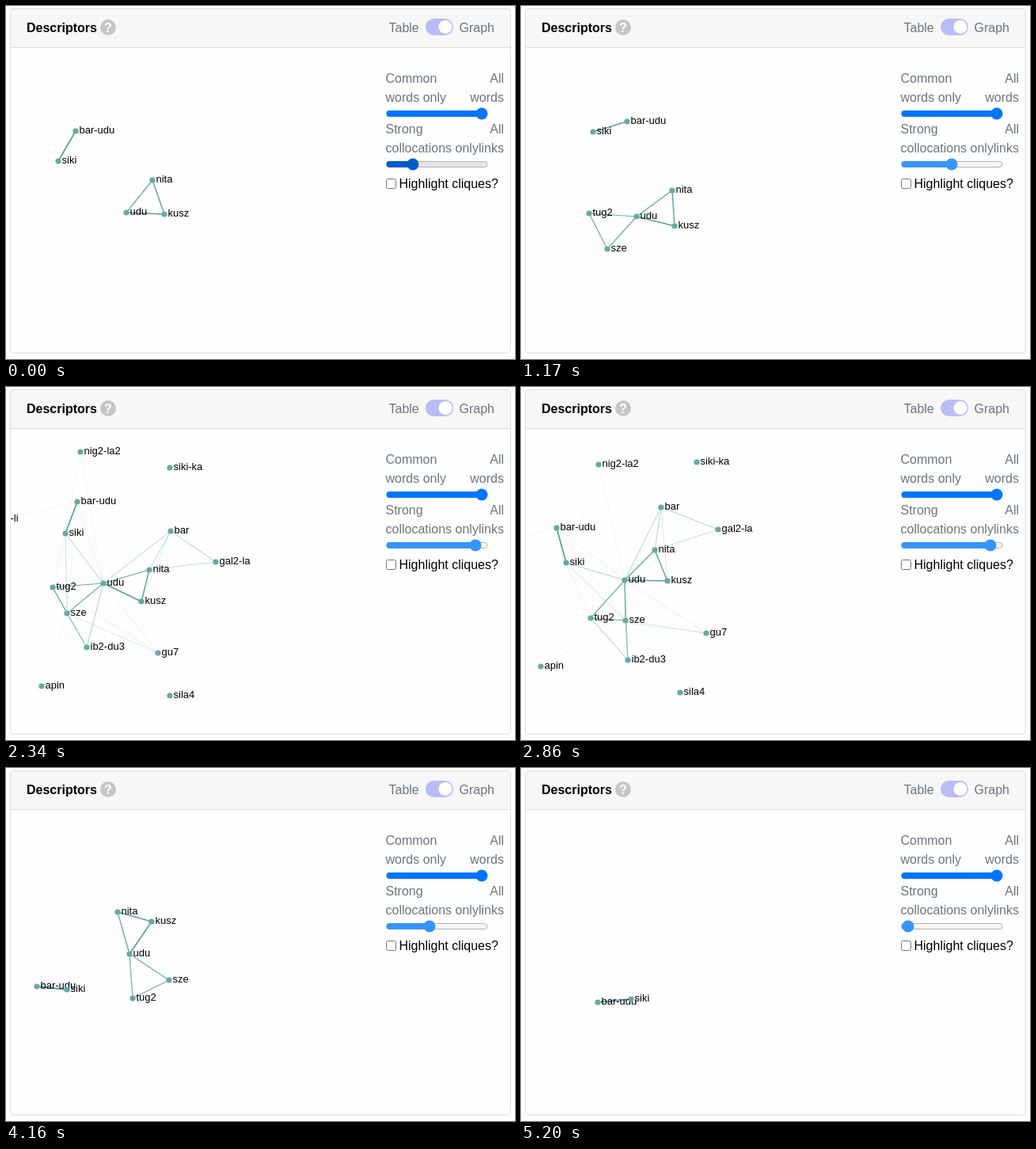
Animation of 643 by 446 pixels, one loop 5.33 s. Source, as an HTML page:

```html
<!DOCTYPE html>
<html lang="en">
<head>
<meta charset="utf-8">
<title>Descriptors graph</title>
<style>
  html, body { margin: 0; width: 100%; height: 100%; overflow: hidden; background: #fff; }
  svg { display: block; width: 643px; height: 446px; font: 16px "Liberation Sans", Arial, sans-serif; }
  .muted { fill: #6c757d; }
  .end { text-anchor: end; }
  .bold { font-weight: bold; }
  #links line { stroke: #5aa39d; }
  #nodes circle { fill: #67a9a0; }
  #nodes text { font-size: 13px; fill: #000; }
</style>
</head>
<body>
<svg viewBox="0 0 643 446">
  <defs><clipPath id="pane"><rect x="6" y="53" width="631" height="385"/></clipPath></defs>

  <rect x="5.5" y="3.5" width="632" height="435" rx="4" fill="#fefefe"/>
  <path d="M5.5 52.5V7.5a4 4 0 0 1 4-4h624a4 4 0 0 1 4 4v45z" fill="#f7f7f7"/>
  <path d="M6 52.5H637" stroke="#dedede"/>
  <rect x="5.5" y="3.5" width="632" height="435" rx="4" fill="none" stroke="#dedede"/>

  <text class="bold" x="26" y="33">Descriptors</text>
  <circle cx="129" cy="27" r="10" fill="#c6c6c6"/>
  <text class="bold" x="129" y="33" text-anchor="middle" fill="#fff">?</text>

  <g class="muted">
    <text x="483.5" y="33">Table</text>
    <text x="572.5" y="33">Graph</text>
    <text x="479.5" y="97">Common</text>
    <text x="479.5" y="121">words only</text>
    <text x="479.5" y="161">Strong</text>
    <text x="479.5" y="185">collocations only</text>
    <g class="end">
      <text x="629" y="97">All</text>
      <text x="629" y="121">words</text>
      <text x="629" y="161">All</text>
      <text x="629" y="185">links</text>
    </g>
  </g>
  <rect x="530" y="16" width="35" height="21" rx="10.5" fill="#b9bdf7"/>
  <circle cx="555" cy="26.5" r="8.5" fill="#fff"/>

  <g>
    <rect x="481" y="132.5" width="127" height="7" rx="3.5" fill="#efefef" stroke="#b2b2b2"/>
    <rect x="480.5" y="132" width="124" height="8" rx="4" fill="#0075ff"/>
    <circle cx="601" cy="136" r="7.5" fill="#0075ff"/>
  </g>
  <g>
    <rect id="track" x="481" y="196.5" width="127" height="7" rx="3.5" stroke="#b2b2b2"/>
    <rect id="fill" x="480.5" y="196" height="8" rx="4"/>
    <circle id="thumb" cy="200" r="7.5"/>
  </g>

  <rect x="480.5" y="218.5" width="12" height="12" rx="2" fill="#fff" stroke="#767676"/>
  <text x="496.5" y="230">Highlight cliques?</text>

  <g clip-path="url(#pane)"><g id="links"></g><g id="nodes"></g></g>
</svg>
<script>
const LOOP = 5330, STEP = 130;
const KEYS = [0, 1170, 2340, 2860, 3640, 4160, 5200];

// Strength slider: [time, thumb x]
const SLIDER = [[0, 514], [260, 515], [650, 530], [1170, 544], [2150, 593], [3000, 593],
  [3640, 570], [4160, 535], [4820, 489], [5330, 489]];

// name: [slider x from which it shows, first key, positions at successive keys]
const NODES = {
  'bar-udu': [0, 0, [[88, 158], [134, 146], [90, 145], [45, 178], [29, 227], [39, 276], [97, 296]]],
  'siki': [0, 0, [[66, 196], [91, 159], [75, 185], [57, 222], [65, 258], [77, 280], [139, 292]]],
  'udu': [505, 0, [[152, 261], [146, 266], [123, 248], [131, 244], [144, 245], [156, 235], [155, 225]]],
  'nita': [505, 0, [[185, 220], [191, 233], [181, 231], [169, 206], [149, 190], [141, 182], [110, 195]]],
  'kusz': [505, 0, [[200, 263], [194, 278], [171, 271], [185, 245], [187, 216], [184, 194], [150, 176]]],
  'tug2': [524, 1, [[86, 262], [59, 253], [88, 292], [130, 296], [160, 291]]],
  'sze': [524, 1, [[109, 307], [77, 286], [132, 295], [180, 295], [206, 268]]],
  'ib2-du3': [545, 2, [[102, 329], [135, 345], [137, 345]]],
  'bar': [555, 2, [[208, 182], [177, 152], [133, 136]]],
  'gal2-la': [555, 2, [[265, 221], [249, 180], [211, 134]]],
  'nig2-la2': [580, 2, [[94, 82], [98, 98]]],
  'siki-ka': [580, 2, [[207, 102], [222, 95]]],
  'gu7': [580, 2, [[192, 336], [234, 311]]],
  'apin': [585, 2, [[45, 378], [25, 353]]],
  'sila4': [585, 2, [[207, 390], [201, 386]]],
  '-li': [585, 2, [[1, 167], [-40, 200]]]
};

// from, to, width, opacity, slider x from which it shows
const LINKS = [
  ['bar-udu', 'siki', 1.8, 1, 0], ['udu', 'kusz', 1.7, 1, 0], ['nita', 'kusz', 1.4, 1, 0],
  ['udu', 'nita', 1.3, .95, 0], ['tug2', 'udu', 1.2, .9, 0], ['tug2', 'sze', 1.2, .9, 0],
  ['sze', 'udu', 1.2, .9, 0], ['sze', 'ib2-du3', 1, .65, 0], ['tug2', 'ib2-du3', 1, .55, 0],
  ['udu', 'ib2-du3', 1, .5, 0], ['siki', 'udu', 1, .5, 555], ['siki', 'sze', 1, .3, 563],
  ['bar', 'gal2-la', 1, .5, 0], ['bar', 'nita', 1, .45, 0], ['bar', 'udu', 1, .45, 0],
  ['nita', 'gal2-la', 1, .35, 0], ['bar', 'kusz', 1, .2, 580], ['siki', 'tug2', 1, .12, 580],
  ['bar-udu', 'udu', 1, .12, 580], ['bar-udu', 'sze', 1, .1, 580], ['gu7', 'sze', 1, .22, 0],
  ['gu7', 'tug2', 1, .15, 0], ['gu7', 'udu', 1, .15, 0], ['nig2-la2', 'udu', 1, .09, 0],
  ['nig2-la2', 'siki', 1, .08, 0], ['siki-ka', 'udu', 1, .09, 0], ['apin', 'sze', 1, .09, 0],
  ['-li', 'bar-udu', 1, .09, 0]
];

const $ = id => document.getElementById(id);

function add(parent, tag, attrs) {
  const el = document.createElementNS('http://www.w3.org/2000/svg', tag);
  set(el, attrs);
  return parent.appendChild(el);
}

function set(el, attrs) {
  for (const k in attrs) el.setAttribute(k, attrs[k]);
}

const linkEls = LINKS.map(([, , w, o]) => add($('links'), 'line', { 'stroke-width': w, 'stroke-opacity': o }));
const nodeEls = {};
for (const name in NODES) {
  const g = add($('nodes'), 'g', {});
  add(g, 'circle', { r: 3.6 });
  add(g, 'text', { x: 4.5, y: 3 }).textContent = name;
  nodeEls[name] = g;
}

function sliderAt(t) {
  const i = SLIDER.findIndex(([end]) => t < end);
  const [t0, x0] = SLIDER[i - 1], [t1, x1] = SLIDER[i];
  return x0 + (x1 - x0) * (t - t0) / (t1 - t0);
}

// Smooth curve through the points p at times ts
function curve(ts, p, t) {
  const last = ts.length - 1;
  let i = 0;
  while (i < last - 1 && t >= ts[i + 1]) i++;
  const h = ts[i + 1] - ts[i], u = (t - ts[i]) / h;
  const slope = (j, k) => {
    const a = Math.max(j - 1, 0), b = Math.min(j + 1, last);
    return (p[b][k] - p[a][k]) / (ts[b] - ts[a]) * h;
  };
  const v = 1 - u;
  return [0, 1].map(k =>
    v * v * (1 + 2 * u) * p[i][k] + u * u * (3 - 2 * u) * p[i + 1][k] +
    u * v * v * slope(i, k) - u * u * v * slope(i + 1, k));
}

// Outside its own keys a node keeps its offset from the hub
function place(name, t) {
  const [, first, points] = NODES[name];
  const ts = KEYS.slice(first, first + points.length);
  const inside = Math.min(Math.max(t, ts[0]), ts[ts.length - 1]);
  const p = curve(ts, points, inside);
  if (inside === t) return p;
  const now = place('udu', t), then = place('udu', inside);
  return p.map((c, k) => c + now[k] - then[k]);
}

function draw(t) {
  const x = sliderAt(t), hover = t < STEP;
  const color = hover ? '#005cc8' : '#3793ff';
  set($('track'), { fill: hover ? '#e5e5e5' : '#f5f5f5' });
  set($('fill'), { width: x - 480.5, fill: color });
  set($('thumb'), { cx: x, fill: color });

  const at = {};
  for (const name in NODES) {
    const shown = x >= NODES[name][0];
    if (shown) {
      at[name] = place(name, t);
      set(nodeEls[name], { transform: `translate(${at[name]})` });
    }
    nodeEls[name].style.display = shown ? '' : 'none';
  }
  LINKS.forEach(([from, to, , , min], i) => {
    const a = at[from], b = at[to], shown = a && b && x >= min;
    if (shown) set(linkEls[i], { x1: a[0], y1: a[1], x2: b[0], y2: b[1] });
    linkEls[i].style.display = shown ? '' : 'none';
  });
}

const start = performance.now();
function tick() {
  const t = (performance.now() - start) % LOOP;
  draw(Math.floor(t / STEP) * STEP);
  requestAnimationFrame(tick);
}
tick();
</script>
</body>
</html>
```
